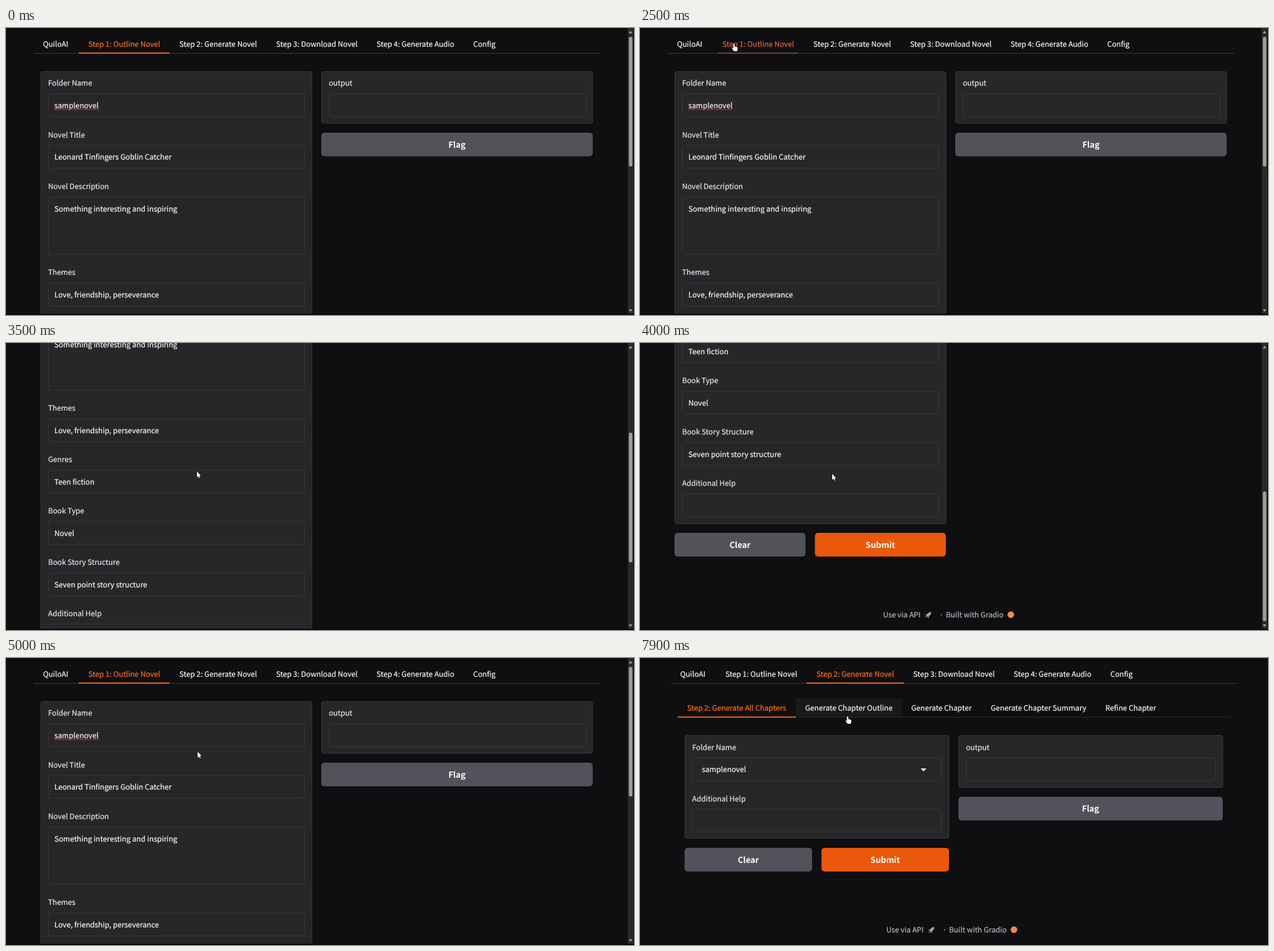
These frames come from a looping animation (1000x458 px, 8 s). An HTML page:

```html
<!DOCTYPE html>
<html lang="en">
<head>
<meta charset="utf-8">
<title>Novel outline demo</title>
<style>
  html, body { margin: 0; width: 100%; height: 100%; overflow: hidden; background: #0f0f11; }
  svg { display: block; }
  text {
    font: 400 11.76px "Noto Sans CJK JP", "Noto Sans CJK SC", "Noto Sans CJK KR", "Open Sans", sans-serif;
    fill: #f4f4f5; stroke: #f4f4f5; stroke-width: .22;
    text-rendering: geometricPrecision; white-space: pre;
  }
  .label { fill: #e4e4e8; stroke: #e4e4e8; }
  .on { fill: #f4701f; stroke: #f4701f; }
  .foot { fill: #b4b4bb; stroke: #b4b4bb; }
  .btn { font-size: 13.1px; font-weight: 700; fill: #fff; stroke: none; text-anchor: middle; }
  .bar { fill: #f4701f; }
  .thin { fill: #b2502c; display: none; }
  .fresh .bar { display: none; }
  .fresh .thin { display: inline; }
  #outline.fresh .on { fill: #d8633c; stroke: #d8633c; }
</style>
</head>
<body>
<svg id="stage" width="1000" height="458" viewBox="0 0 1000 458"></svg>
<script>
const LOOP = 8000, STEP = 100, SWITCH = 6000;
const PANEL = '#27272a', EDGE = '#38383c', GREY = '#52525b', ORANGE = '#ea580c';

// Text is placed by the middle of its capitals.
const text = (x, y, s, cls = '') => `<text class="${cls}" x="${x}" y="${y + 4.4}">${s}</text>`;
const rect = (x, y, w, h, fill, extra = '') =>
  `<rect x="${x}" y="${y}" width="${w}" height="${h}" fill="${fill}" ${extra}/>`;
const frame = (x, y, w, h) =>
  rect(x + .5, y + .5, w - 1, h - 1, PANEL, `rx="3" stroke="${EDGE}"`);
const field = (x, y, w, label, value = '', h = 37.5, indent = 10) =>
  text(x, y, label, 'label') + frame(x, y + 16.6, w, h) + text(x + indent, y + 35.5, value);
const button = (x, y, w, s, fill = GREY) =>
  rect(x, y, w, 37.7, fill, 'rx="5"') +
  `<text class="btn" x="${x + w / 2}" y="${y + 23.9}">${s}</text>`;

const underline = (x, w, y, inset) =>
  `<rect class="bar" x="${x}" y="${y}" width="${w}" height="1.8"/>` +
  `<rect class="thin" x="${x + inset}" y="${y + .4}" width="${w - 2 * inset}" height="1.2"/>`;

const tabRow = (tabs, active, y) =>
  tabs.map(([x, s], i) => text(x, y, s, i === active ? 'on' : '')).join('');

const MAIN = [[59, 'QuiloAI'], [131, 'Step 1: Outline Novel'], [276, 'Step 2: Generate Novel'],
  [430, 'Step 3: Download Novel'], [590, 'Step 4: Generate Audio'], [744, 'Config']];
const SUB = [[75, 'Step 2: Generate All Chapters'], [263, 'Generate Chapter Outline'],
  [432, 'Generate Chapter'], [558.5, 'Generate Chapter Summary'], [741, 'Refine Chapter']];

const nav = active => rect(44, 40, 902, 1, '#3a3a3f') + tabRow(MAIN, active, 26);

const footer = (x, y) => `<g transform="translate(${x} ${y})">` +
  text(392, 0, 'Use via API', 'foot') +
  `<g transform="translate(464 0) rotate(45)">
     <path d="M-2.2 3V-2Q-2 -5 0 -6.5Q2 -5 2.2 -2V3Z" fill="#a9a3a3"/>
     <path d="M-2.2 0L-4.2 3.6L-2.2 3ZM2.2 0L4.2 3.6L2.2 3ZM-1.3 3.6H1.3L0 6.6Z" fill="#d9652b"/>
   </g>` +
  text(481.5, 0, '·', 'foot') + text(492, 0, 'Built with Gradio', 'foot') +
  '<circle cx="595.5" cy="-.5" r="5.2" fill="#ee8a4f"/></g>';

const squiggle = (x, y, w) => {
  let d = `M${x} ${y}`;
  for (let i = 1; i * 2 <= w; i++) d += `L${x + i * 2} ${y + (i % 2) * 1.6}`;
  return `<path d="${d}" fill="none" stroke="#c8282c" stroke-width="1.1"/>`;
};

const FORM = [
  [88, 'Folder Name', 'samplenovel'],
  [170.2, 'Novel Title', 'Leonard Tinfingers Goblin Catcher'],
  [252.8, 'Novel Description', 'Something interesting and inspiring', 92.5],
  [390, 'Themes', 'Love, friendship, perseverance'],
  [472, 'Genres', 'Teen fiction'],
  [553.8, 'Book Type', 'Novel'],
  [635.6, 'Book Story Structure', 'Seven point story structure'],
  [717.5, 'Additional Help', '']
];

const outlinePage = nav(1) + underline(116, 144, 39.2, 8.5) +
  frame(55, 69, 432.5, 714) +
  FORM.map(([y, label, value, h]) => field(67, y, 409, label, value, h)).join('') +
  squiggle(77, 129, 71) +
  frame(502, 69, 432.5, 83.5) + field(514, 88, 410, 'output') +
  button(502, 167, 432.2, 'Flag') +
  button(55, 797, 208.5, 'Clear') + button(278.5, 797, 208.5, 'Submit', ORANGE) +
  footer(-5, 928);

const generatePage = `<g transform="translate(5 0)">${nav(2)}</g>` +
  underline(265, 155, 39.2, 15) +
  rect(248, 65, 169, 30, '#19191b', 'id="hover"') +
  rect(60, 94, 880, 1, '#2b2b2f') + tabRow(SUB, 0, 80) + underline(60, 188, 93.4, 15) +
  frame(71, 123, 421.5, 165) +
  field(83, 142.5, 397.5, 'Folder Name', 'samplenovel', 37.5, 15.5) +
  '<path d="M447 176.2H456L451.5 181Z" fill="#fff"/>' +
  field(83, 224.2, 397.5, 'Additional Help') +
  frame(507, 123, 421.5, 84) + field(519, 142.5, 397.5, 'output') +
  button(507, 221.5, 421, 'Flag') +
  button(71, 303, 203, 'Clear') + button(289, 303, 203, 'Submit', ORANGE) +
  footer(0, 434);

const scrollbar = rect(990, 0, 9, 458, '#29292b') +
  '<path d="M991.5 8.5L994.5 4.5L997.5 8.5ZM991.5 449L994.5 453L997.5 449Z" fill="#a0a0a0"/>' +
  rect(991.8, 14, 5.6, 207, '#9d9d9d', 'id="thumb" rx="2.8"');

const cursor = `<g id="cursor" stroke="#111" stroke-width="1" paint-order="stroke" stroke-linejoin="round" fill="#fff">
  <path id="arrow" d="M0 0V9.2L2.1 7.4L3.5 10.4L5 9.7L3.6 6.8H6.4Z"/>
  <path id="hand" d="M-1 1Q0 -.8 1.1 1V4.6L5 5.6Q6.3 6 6 7.5L5.2 12H.2L-2.8 8Q-3.4 6.6 -2.2 6.6L-1 7.6Z"/>
</g>`;

stage.innerHTML = rect(0, 0, 1000, 458, '#0f0f11') +
  `<g id="outline"><g id="doc">${outlinePage}</g>${scrollbar}</g>` +
  `<g id="generate">${generatePage}</g>` +
  rect(0, 456, 1000, 2, '#0a0a0b') + cursor;

// Keys: time, then values.
const SCROLL = [[3100, 0], [3200, 50], [3500, 286], [3800, 455], [4000, 494],
  [4300, 494], [4400, 335], [4500, 168], [4600, 60], [4700, 0]];
const POINTER = [[200, 250, 126], [1000, 80, 28], [1500, 127, 34], [1700, 127, 34],
  [2100, 149.5, 25], [3100, 149.5, 25], [3400, 304, 205], [3500, 304, 205],
  [4000, 306, 209], [4200, 309, 212.5], [4500, 309, 212.5], [5000, 305, 149.5],
  [5200, 300, 63], [5400, 300, 63], [5700, 337.5, 34], [6200, 337.5, 34],
  [6800, 136, 244], [6900, 136, 244], [7800, 329, 81], [7900, 330.5, 93]];

function at(keys, t) {
  const i = keys.findIndex(k => k[0] > t);
  if (i === 0) return keys[0].slice(1);
  if (i < 0) return keys[keys.length - 1].slice(1);
  const a = keys[i - 1], b = keys[i], f = (t - a[0]) / (b[0] - a[0]);
  return a.slice(1).map((v, j) => v + (b[j + 1] - v) * f);
}

const $ = id => document.getElementById(id);
const show = (id, on) => { $(id).style.display = on ? '' : 'none'; };

function draw(time) {
  const t = Math.floor(time % LOOP / STEP) * STEP;
  const second = t >= SWITCH;
  const [s] = at(SCROLL, t), [x, y] = at(POINTER, t);
  const hand = s === 0 && (y > 14 && y < 41 || second && y > 66 && y < 95);

  show('outline', !second);
  show('generate', second);
  show('hover', t >= 7900);
  show('cursor', t >= 200);
  show('hand', hand);
  show('arrow', !hand);
  $('doc').setAttribute('transform', `translate(0 ${-s})`);
  $('thumb').setAttribute('y', 14 + s * .4514);
  $('cursor').setAttribute('transform', `translate(${x} ${y})`);
  $('outline').classList.toggle('fresh', t >= 2500 && t < 2700);
  $('generate').classList.toggle('fresh', second && t < SWITCH + 100);
}

const start = performance.now();
(function tick() {
  draw(performance.now() - start);
  requestAnimationFrame(tick);
})();
</script>
</body>
</html>
```
